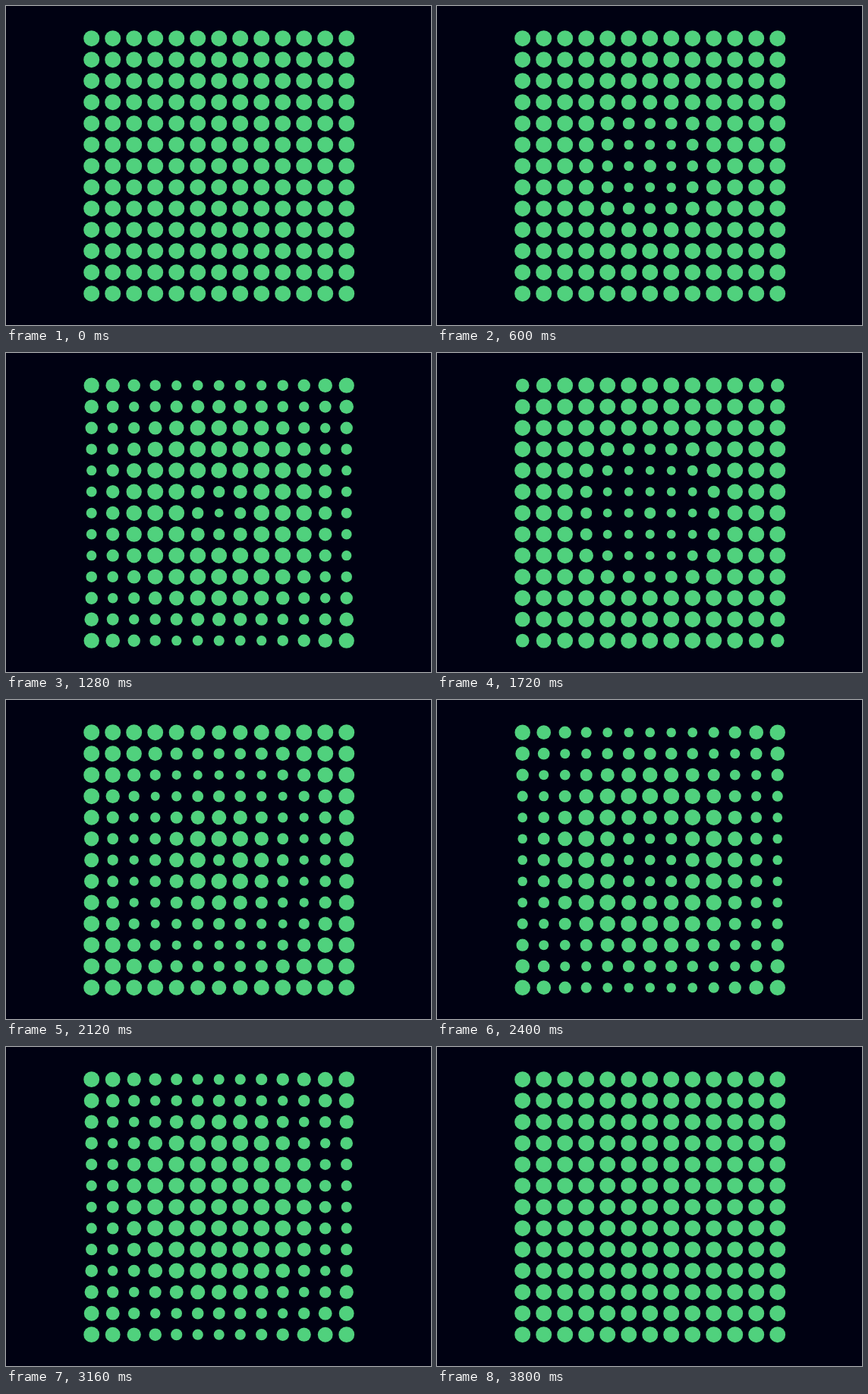
Animation of 560 by 420 pixels, one loop 3.84 s. Source, as an HTML page with a canvas:

```html
<!DOCTYPE html>
<html lang="en">
<head>
<meta charset="utf-8">
<title>Dot ripple</title>
<style>
  html, body { margin: 0; width: 100%; height: 100%; overflow: hidden; background: #000112; }
  canvas { display: block; }
</style>
</head>
<body>
<canvas width="560" height="420"></canvas>
<script>
const ctx = document.querySelector('canvas').getContext('2d');
const LOOP = 3840;
const HALF = 6;
const PITCH = 28;
const CENTER = { x: 280.7, y: 210.7 };
const R_MAX = 10.5;
const R_MIN = 5.9;
const EDGE = 240;

// Each ripple: midpoint of shrinking and growing as a polynomial of distance.
const ripples = [
  { shrink: [220, 168.9, -3], grow: [600, 127, 0] },
  { shrink: [1009, 244, -7.1], grow: [1765, 129, 0] },
  { shrink: [2090, 201, -6.05], grow: [2495, 144.5, -1.7] }
];

const poly = ([a, b, c], d) => a + b * d + c * d * d;

// Sine ease from 0 to 1 around a midpoint.
function ease(x) {
  const p = Math.max(-1, Math.min(1, x / EDGE));
  return (1 + Math.sin(p * Math.PI / 2)) / 2;
}

const dots = [];
for (let row = -HALF; row <= HALF; row++) {
  for (let col = -HALF; col <= HALF; col++) {
    const d = Math.hypot(row, col);
    dots.push({
      x: CENTER.x + col * PITCH,
      y: CENTER.y + row * PITCH,
      dips: ripples.map(r => [poly(r.shrink, d), poly(r.grow, d)])
    });
  }
}

function radius(dips, t) {
  const size = Math.min(...dips.map(([down, up]) => Math.max(ease(down - t), ease(t - up))));
  return R_MIN + (R_MAX - R_MIN) * size;
}

function draw(t) {
  ctx.fillStyle = '#000112';
  ctx.fillRect(0, 0, 560, 420);
  ctx.fillStyle = '#50d17d';
  for (const { x, y, dips } of dots) {
    ctx.beginPath();
    ctx.arc(x, y, radius(dips, t), 0, Math.PI * 2);
    ctx.fill();
  }
}

const start = performance.now();
function tick() {
  draw((performance.now() - start) % LOOP);
  requestAnimationFrame(tick);
}
tick();
</script>
</body>
</html>
```
